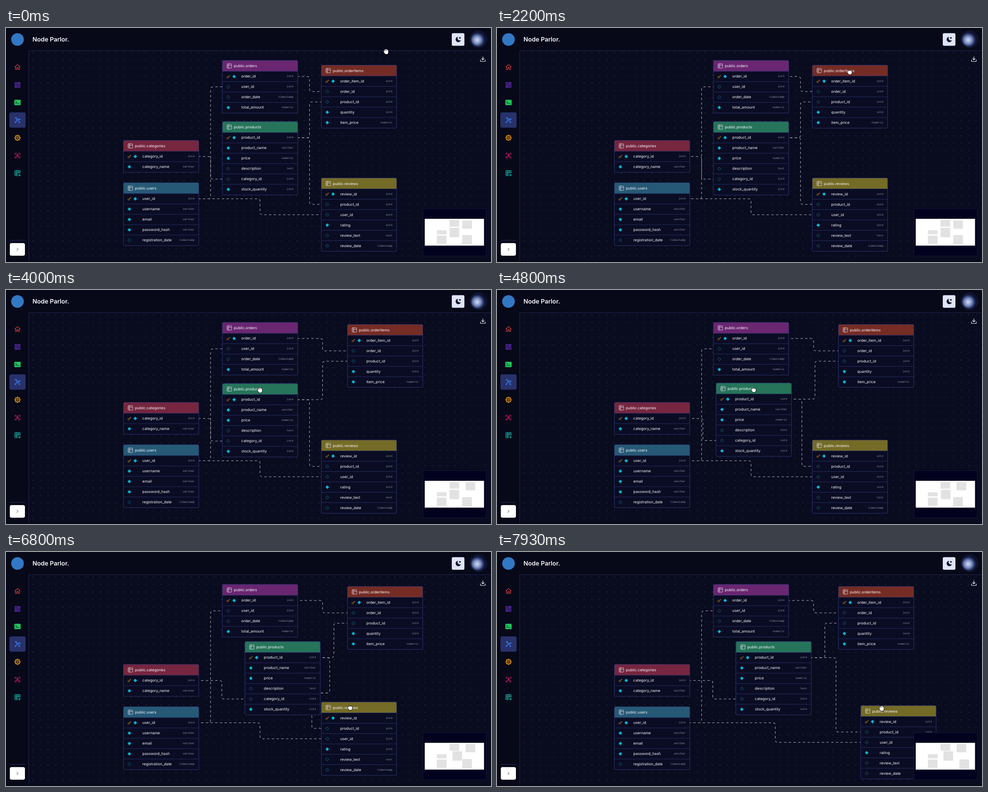
An HTML page for the animation above (8000 ms loop, 1076 by 520 pixels).

```html
<!DOCTYPE html>
<html lang="en">
<head>
<meta charset="utf-8">
<title>Schema diagram</title>
<style>
  html, body { margin: 0; width: 100%; height: 100%; overflow: hidden; background: #070919; }
  svg { display: block; width: 100%; height: 100%; text-rendering: geometricPrecision; }
  text { font-family: Inter, "Liberation Sans", sans-serif; fill: #f8f8fc; }
  .title { font-size: 13.6px; font-weight: 600; }
  .name { font-size: 7.9px; }
  .type { font-family: "Liberation Mono", "DejaVu Sans Mono", monospace; font-size: 6px; fill: #9094a6; text-anchor: end; }
  .icon { fill: none; stroke-width: 2; stroke-linecap: round; stroke-linejoin: round; }
  .edge { fill: none; stroke: #b9bac4; stroke-width: 1; stroke-dasharray: 5; }
</style>
</head>
<body>
<svg id="stage" viewBox="0 0 1076 520" xmlns="http://www.w3.org/2000/svg"></svg>
<script>
const LOOP = 8000, FPS = 15;
const ZOOM = 1.0452, ORIGIN = { x: 260.5, y: 72 };
const WIDTH = 160, HEAD = 23.25, ROW = 22;
const MAP = { x: 929, y: 424, scale: 0.1283 };

// Column marks: * primary key, + required, - nullable
const tables = {
  orders: { x: 210, y: 0, color: '#6a2671', columns: [
    '*order_id int4', '-user_id int4', '-order_date timestamp', '+total_amount numeric'] },
  products: { x: 210, y: 130, color: '#26745a', columns: [
    '*product_id int4', '+product_name varchar', '+price numeric',
    '-description text', '-category_id int4', '+stock_quantity int4'] },
  categories: { x: 0, y: 170, color: '#76263f', columns: [
    '*category_id int4', '+category_name varchar'] },
  users: { x: 0, y: 260, color: '#265976', columns: [
    '*user_id int4', '+username varchar', '+email varchar',
    '+password_hash varchar', '-registration_date timestamp'] },
  orderitems: { x: 420, y: 10, color: '#752c25', columns: [
    '*order_item_id int4', '-order_id int4', '-product_id int4',
    '+quantity int4', '+item_price numeric'] },
  reviews: { x: 420, y: 250, color: '#746b26', columns: [
    '*review_id int4', '-product_id int4', '-user_id int4', '+rating int4',
    '-review_text text', '-review_date timestamp'] }
};

// Source table (first row), target table, target row
const links = [
  ['orders', 'orderitems', 1], ['products', 'orderitems', 2],
  ['products', 'reviews', 1], ['users', 'orders', 1],
  ['users', 'reviews', 2], ['categories', 'products', 4]
];

// Pointer stops: time, x, y
const stops = [
  [0, 843, 52], [1020, 843, 52], [1720, 782, 97], [2670, 782, 97],
  [3200, 840, 91], [3220, 840, 91], [3860, 563, 222], [4650, 563, 222],
  [5340, 613, 213], [5800, 613, 213], [6550, 763, 345], [6810, 763, 345],
  [7700, 870.5, 353], [7830, 870.5, 353], [7933, 853, 347], [8000, 853, 347]
];
const drags = [
  { table: 'orderitems', press: 2150, from: 2670, to: 3200 },
  { table: 'products', press: 4600, from: 4650, to: 5340 },
  { table: 'reviews', press: 6800, from: 6810, to: 7700 }
];

const icon = (x, y, size, color, body) =>
  `<g class="icon" stroke="${color}" transform="translate(${x - size / 2} ${y - size / 2}) scale(${size / 24})">${body}</g>`;
const box = (x, y, w, h, fill, rx = 0, more = '') =>
  `<rect x="${x}" y="${y}" width="${w}" height="${h}" rx="${rx}" fill="${fill}" ${more}/>`;
const path = d => `<path d="${d}"/>`;

const TABLE_ICON = box(3, 3, 18, 18, 'none', 2) + path('M9 3V21M3 9H21M3 15H9');
const KEY_ICON = '<circle cx="7.5" cy="15.5" r="5"/>' + path('M11 12L21 2M16 7L19 10L22 7L19 4');
const HAND = {
  open: 'M-2.6 1V-3.2M-.2 0V-4.4M2.1 0V-4M4.2 1V-2.4M-4.6 .2L-2.4 3M-2.6 0H4.2V3L3 5.2H-1L-2.6 3Z',
  fist: 'M-2.6 0V-1.6M-.2 0V-2M2.1 0V-1.8M4.2 1V-1M-4.2 1L-2.4 3M-2.6 0H4.2V3L3 5.2H-1L-2.6 3Z'
};

function columnMarkup(column, i) {
  const [label, type] = column.slice(1).split(' ');
  const mark = column[0], y = HEAD + ROW * (i + .5);
  const cx = mark === '*' ? 25 : 12.6;
  const paint = mark === '-' ? 'fill="none" stroke="#12839a"' : 'fill="#06b6d4" stroke="#06b6d4"';
  return `<path d="M0 ${HEAD + ROW * i}H${WIDTH}" stroke="#252d63"/>` +
    (mark === '*' ? icon(12.6, y + .3, 8, '#dc9a14', KEY_ICON) : '') +
    `<path d="M${cx} ${y - 3.4}l3.4 3.4l-3.4 3.4l-3.4 -3.4Z" ${paint} stroke-width=".8" stroke-linejoin="round"/>` +
    `<text class="name" x="40.3" y="${y + 2.5}">${label}</text>` +
    `<text class="type" x="151" y="${y + 1.6}">${type}</text>`;
}

function tableMarkup([name, t]) {
  const h = tableHeight(t);
  return `<g id="${name}">` + box(0, 0, WIDTH, h, '#0a0c23', 3) +
    `<path d="M0 ${HEAD}V3Q0 0 3 0H${WIDTH - 3}Q${WIDTH} 0 ${WIDTH} 3V${HEAD}Z" fill="${t.color}"/>` +
    icon(14.8, 11.8, 12.5, '#d9d5e2', `<g stroke-width="1.6">${TABLE_ICON}</g>`) +
    `<text class="name" x="24.4" y="14.6">public.${name}</text>` +
    t.columns.map(columnMarkup).join('') +
    box(0, 0, WIDTH, h, 'none', 3, 'stroke="#2b3570"') + '</g>';
}

const tableHeight = t => HEAD + .75 + ROW * t.columns.length;

function dots() {
  const gap = 16 * ZOOM;
  return `<pattern id="dots" width="${gap}" height="${gap}" patternUnits="userSpaceOnUse" ` +
    `x="${ORIGIN.x - gap / 2}" y="${ORIGIN.y - gap / 2}">` +
    `<circle cx="${gap / 2}" cy="${gap / 2}" r=".75" fill="#484c66"/></pattern>`;
}

function sidebar() {
  const gear = Array.from({ length: 8 }, (_, i) =>
    `<path d="M10 4.5L10.6 2H13.4L14 4.5" transform="rotate(${i * 45} 12 12)"/>`).join('');
  return icon(25.5, 87, 14, '#ef4444', path('M2 11L12 2L22 11M4.5 9V21H9.5V14H14.5V21H19.5V9')) +
    icon(25.5, 126.5, 14.5, '#7c3aed',
      box(3, 3, 7, 9, 'none', 1) + box(14, 3, 7, 5, 'none', 1) +
      box(14, 12, 7, 9, 'none', 1) + box(3, 16, 7, 5, 'none', 1)) +
    box(18.5, 159.5, 14, 12, '#22c55e', 1.5) +
    icon(25.5, 165.5, 14, '#07301a', path('M5 8L9 12L5 16M11 16H18')) +
    box(7.5, 187.5, 36, 34, '#28326a', 4) +
    icon(25.5, 204.5, 14, '#3b82f6',
      '<circle cx="12" cy="11" r="3"/><circle cx="6" cy="4" r="2"/><circle cx="20" cy="9" r="2"/>' +
      '<circle cx="4" cy="20" r="2"/><circle cx="19" cy="20" r="2"/>' +
      path('M7.3 5.6L10 8.6M15 10.5L18 9.5M10 13.3L5.4 18.5M14 13.3L17.6 18.4')) +
    icon(25.5, 244, 14.5, '#f59e0b', gear + '<circle cx="12" cy="12" r="7.8"/><circle cx="12" cy="12" r="3"/>') +
    icon(25.5, 283.5, 14, '#e61e78',
      path('M3 8V3H8M16 3H21V8M21 16V21H16M8 21H3V16M7 18Q8 14 12 14T17 18') + '<circle cx="12" cy="9" r="2.8"/>') +
    icon(25.5, 322.5, 15, '#14b8a6', path('M21 12V4Q21 3 20 3H4Q3 3 3 4V20Q3 21 4 21H12M3 9H21M9 3V21M3 15H13M15 3V12M19 15V23M15 19H23')) +
    '<path d="M8.5 472H42" stroke="#2a3060"/>' +
    box(8.5, 478, 33.5, 28, '#fff', 4) +
    icon(25.3, 492, 10, '#14162a', path('M9 5L16 12L9 19'));
}

function topbar() {
  return '<circle cx="25.5" cy="25.5" r="14" fill="#3278c4"/>' +
    '<text class="title" x="58.7" y="30.3">Node Parlor.</text>' +
    box(989, 11.5, 28, 28, '#e0e5fb', 3) +
    '<path d="M1003 19.5A6 6 0 1 0 1009.3 27A5 5 0 0 1 1003 19.5Z" fill="#10142c"/>' +
    '<path d="M1007 19l.9 2.1l2.1 .9l-2.1 .9l-.9 2.1l-.9 -2.1l-2.1 -.9l2.1 -.9Z" fill="#10142c"/>' +
    '<circle cx="1048" cy="25" r="18.5" fill="#080b1d" stroke="#222a55"/>' +
    '<circle cx="1048" cy="25" r="16.5" fill="url(#photo)"/>';
}

const stage = document.getElementById('stage');
stage.innerHTML = '<defs>' + dots() +
  '<radialGradient id="photo" cx=".42" cy=".55" r=".6"><stop offset="0" stop-color="#d5def5"/>' +
  '<stop offset=".4" stop-color="#8093c6"/><stop offset=".75" stop-color="#1c2857"/>' +
  '<stop offset="1" stop-color="#080b20"/></radialGradient></defs>' +
  box(0, 0, 1076, 520, '#070919') + box(51, 51, 1025, 467, '#090b1e') +
  box(51, 51, 1025, 467, 'url(#dots)') +
  `<g transform="translate(${ORIGIN.x} ${ORIGIN.y}) scale(${ZOOM})">` +
  links.map((_, i) => `<path class="edge" id="edge${i}"/>`).join('') +
  Object.entries(tables).map(tableMarkup).join('') + '</g>' +
  '<path d="M50.5 518V50.5H1076" fill="none" stroke="#232852"/>' +
  topbar() + sidebar() +
  icon(1058, 69, 14, '#f4f5fa', path('M21 15V20Q21 21 20 21H4Q3 21 3 20V15M7 10L12 15L17 10M12 15V3')) +
  box(925, 401.5, 140.5, 105, '#02021f', 0, 'stroke="#15183a"') +
  box(MAP.x, MAP.y, 131.5, 59.6, '#fff') +
  Object.entries(tables).map(([name, t]) =>
    box(0, 0, WIDTH * ZOOM * MAP.scale, tableHeight(t) * ZOOM * MAP.scale, '#e2e2e2', 0, `id="map-${name}"`)).join('') +
  '<g id="pointer" stroke-linecap="round" stroke-linejoin="round">' +
  '<path fill="#000" stroke="#000" stroke-width="3.2"/><path fill="#fff" stroke="#fff" stroke-width="1.7"/></g>';

const byId = id => document.getElementById(id);
const place = (id, x, y) => byId(id).setAttribute('transform', `translate(${x} ${y})`);
const clamp = (v, lo, hi) => Math.min(hi, Math.max(lo, v));

function pointerAt(t) {
  const i = clamp(stops.findIndex(s => s[0] > t), 1, stops.length - 1);
  const [t0, x0, y0] = stops[i - 1], [t1, x1, y1] = stops[i];
  const p = clamp((t - t0) / (t1 - t0), 0, 1), e = p * p * (3 - 2 * p);
  return { x: x0 + (x1 - x0) * e, y: y0 + (y1 - y0) * e };
}

function tableAt(name, t) {
  const { x, y } = tables[name], drag = drags.find(d => d.table === name);
  if (!drag) return { x, y };
  const a = pointerAt(drag.from), b = pointerAt(clamp(t, drag.from, drag.to));
  return { x: x + (b.x - a.x) / ZOOM, y: y + (b.y - a.y) / ZOOM };
}

function roundedPath(points) {
  const dist = (a, b) => Math.hypot(b[0] - a[0], b[1] - a[1]);
  const toward = (a, b, r) => {
    const k = r / (dist(a, b) || 1);
    return [a[0] + (b[0] - a[0]) * k, a[1] + (b[1] - a[1]) * k];
  };
  let d = 'M' + points[0];
  for (let i = 1; i < points.length - 1; i++) {
    const [a, b, c] = points.slice(i - 1, i + 2);
    const r = Math.min(5, dist(a, b) / 2, dist(b, c) / 2);
    d += `L${toward(b, a, r)}Q${b} ${toward(b, c, r)}`;
  }
  return d + 'L' + points[points.length - 1];
}

function linkPath(a, b, row) {
  const x0 = a.x + WIDTH, y0 = a.y + HEAD + ROW / 2;
  const x1 = b.x, y1 = b.y + HEAD + ROW * (row + .5);
  const mx = (x0 + x1) / 2, my = (y0 + y1) / 2;
  const middle = x0 + 20 < x1 - 20
    ? [[mx, y0], [mx, y1]]
    : [[x0 + 20, y0], [x0 + 20, my], [x1 - 20, my], [x1 - 20, y1]];
  return roundedPath([[x0, y0], ...middle, [x1, y1]]);
}

function draw(t) {
  const at = {};
  for (const name in tables) {
    const p = at[name] = tableAt(name, t);
    place(name, p.x, p.y);
    place('map-' + name,
      MAP.x + (ORIGIN.x + p.x * ZOOM - 51) * MAP.scale,
      MAP.y + (ORIGIN.y + p.y * ZOOM - 52) * MAP.scale);
  }
  const flow = 1.2 - (t % 500) / 50;
  links.forEach(([from, to, row], i) => {
    const edge = byId('edge' + i);
    edge.setAttribute('d', linkPath(at[from], at[to], row));
    edge.setAttribute('stroke-dashoffset', flow);
  });
  const hand = pointerAt(t);
  const held = drags.some(d => t >= d.press && t <= d.to);
  place('pointer', hand.x, hand.y);
  for (const p of byId('pointer').children) p.setAttribute('d', held ? HAND.fist : HAND.open);
}

const start = performance.now();
function tick() {
  const t = (performance.now() - start) % LOOP;
  draw(Math.floor((t + 4) * FPS / 1000) * 1000 / FPS);
  requestAnimationFrame(tick);
}
tick();
</script>
</body>
</html>
```
